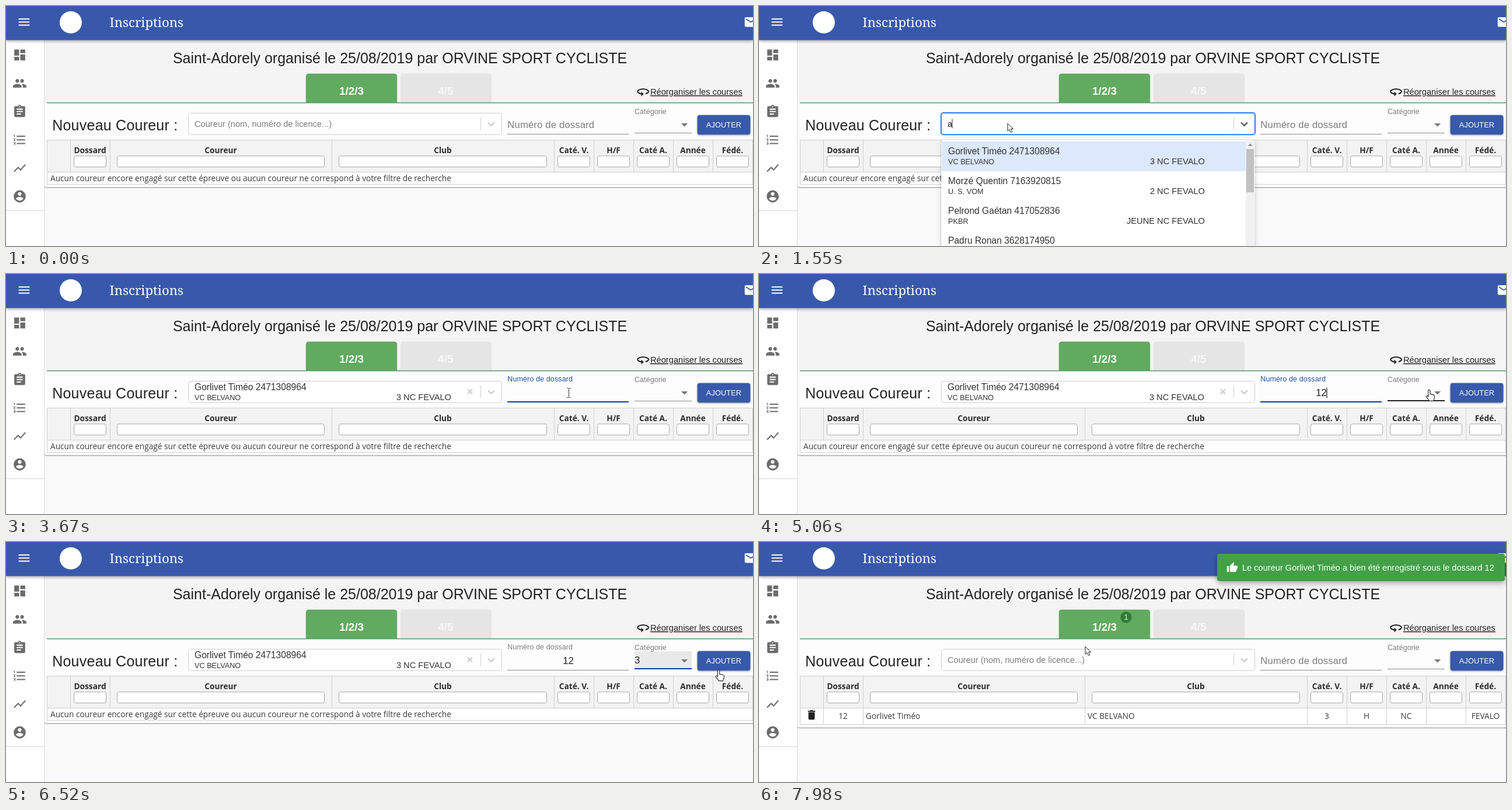
An HTML page for the animation above (8 s loop, 1280 by 411 pixels).

```html
<!DOCTYPE html>
<html lang="fr">
<head>
<meta charset="utf-8">
<title>Inscriptions</title>
<style>
html, body { margin: 0; width: 100%; height: 100%; overflow: hidden; background: #fafafa; }
svg { display: block; width: 100%; height: 100%; }
text { font-family: "Liberation Sans", Arial, sans-serif; fill: #222; }
.tab { font-weight: 700; font-size: 18.9px; text-anchor: middle; }
.os, .th { font-family: "Open Sans", sans-serif; font-size: 13.7px; fill: #3a3a3a; }
.th { font-weight: 700; fill: #2c2c2c; }
.mid { text-anchor: middle; }
.name { font-size: 15.6px; fill: #333; }
.club { font-size: 12.7px; fill: #333; }
.info { font-size: 14.65px; fill: #333; text-anchor: end; }
.mui { letter-spacing: .0094em; }
</style>
</head>
<body>
<svg id="stage" viewBox="0 0 1280 411" preserveAspectRatio="none"></svg>
<script>
const LOOP = 8000;
const RIDER = 'Gorlivet Timéo', CLUB = 'VC BELVANO', FED = 'FEVALO';

// ---- drawing helpers
const rect = (x, y, w, h, fill, more = '') =>
  `<rect x="${x}" y="${y}" width="${w}" height="${h}" fill="${fill}" ${more}/>`;
const text = (x, y, s, cls = '', more = '') => `<text x="${x}" y="${y}" class="${cls}" ${more}>${s}</text>`;
const icon = (x, y, k, fill, d) => `<path transform="translate(${x} ${y}) scale(${k})" fill="${fill}" d="${d}"/>`;
const group = (id, body, more = '') => `<g id="${id}" ${more}>${body}</g>`;
const line = (x1, y1, x2, y2, c, w = 1) =>
  `<path d="M${x1} ${y1}L${x2} ${y2}" stroke="${c}" stroke-width="${w}"/>`;
const shadow = (y, blur, a) => `style="filter:drop-shadow(0 ${y}px ${blur}px rgba(0,0,0,${a}))"`;

const sideIcons = [
  'M3 13h8V3H3v10zm0 8h8v-6H3v6zm10 0h8V11h-8v10zm0-18v6h8V3h-8z',
  'M16 11c1.66 0 3-1.34 3-3s-1.34-3-3-3-3 1.34-3 3 1.34 3 3 3zm-8 0c1.66 0 3-1.34 3-3S9.66 5 8 5 5 6.34 5 8s1.34 3 3 3zm0 2c-2.33 0-7 1.17-7 3.5V19h14v-2.5c0-2.33-4.67-3.5-7-3.5zm8 0c-.3 0-.62 0-.97.05 1.16.84 1.97 1.97 1.97 3.45V19h6v-2.5c0-2.33-4.67-3.5-7-3.5z',
  'M19 3h-4.18a3 3 0 0 0-5.64 0H5a2 2 0 0 0-2 2v14a2 2 0 0 0 2 2h14a2 2 0 0 0 2-2V5a2 2 0 0 0-2-2zm-7 0a1 1 0 0 1 0 2 1 1 0 0 1 0-2zm2 14H7v-2h7v2zm3-4H7v-2h10v2zm0-4H7V7h10v2z',
  'M2 17h2v.5H3v1h1v.5H2v1h3v-4H2v1zm1-9h1V4H2v1h1v3zm-1 3h1.8L2 13.1v.9h3v-1H3.2L5 10.9V10H2v1zm5-6v2h14V5H7zm0 14h14v-2H7v2zm0-6h14v-2H7v2z',
  'M3.5 18.5l6-6 4 4L22 6.9l-1.4-1.4-7.1 8-4-4L2 17z',
  'M12 2a10 10 0 0 0 0 20 10 10 0 0 0 0-20zm0 3a3 3 0 0 1 0 6 3 3 0 0 1 0-6zm0 14.2c-2.5 0-4.7-1.28-6-3.22.03-2 4-3.08 6-3.08s5.97 1.09 6 3.08c-1.3 1.94-3.5 3.22-6 3.22z'
];
const menu = 'M3 18h18v-2H3v2zm0-5h18v-2H3v2zm0-7v2h18V6z';
const mail = 'M20 4H4a2 2 0 0 0-2 2v12a2 2 0 0 0 2 2h16a2 2 0 0 0 2-2V6a2 2 0 0 0-2-2zm0 4l-8 5-8-5V6l8 5 8-5v2z';
const turn = 'M12 7C6.48 7 2 9.24 2 12c0 2.24 2.94 4.13 7 4.77V20l4-4-4-4v2.73c-3.15-.56-5-1.9-5-2.73 0-1.06 3.04-3 8-3s8 1.94 8 3c0 .73-1.46 1.89-4 2.53v2.05c3.53-.77 6-2.53 6-4.58 0-2.76-4.48-5-10-5z';
const thumb = 'M1 21h4V9H1v12zm22-11a2 2 0 0 0-2-2h-6.3l1-4.9c0-.4-.2-.8-.5-1L14.2 1 7.6 7.6A2 2 0 0 0 7 9v10a2 2 0 0 0 2 2h9c.8 0 1.5-.5 1.8-1.2l3-7c.1-.3.2-.5.2-.8z';
const bin = 'M6 19a2 2 0 0 0 2 2h8a2 2 0 0 0 2-2V7H6v12zM19 4h-3.5l-1-1h-5l-1 1H5v2h14V4z';

// ---- page parts
const edges = [70, 110, 178, 558, 939, 1007, 1075, 1143, 1211, 1279];
const heads = ['', 'Dossard', 'Coureur', 'Club', 'Caté. V.', 'H/F', 'Caté A.', 'Année', 'Fédé.'];
const cells = ['', '12', RIDER, CLUB, '3', 'H', 'NC', '', FED];
const mid = i => (edges[i] + edges[i + 1]) / 2;
const grid = (y1, y2) => edges.map(x => line(x + .5, y1, x + .5, y2, '#cfcfcf')).join('');
const tab = (x, fill) => `<path d="M${x} 165V121q0-5.3 5-5.3h146.4q5 0 5 5.3v44z" fill="${fill}"/>`;

function tableHead() {
  let s = rect(70, 229, 1209, 56, '#f3f3f3') + line(70, 229.5, 1280, 229.5, '#cfcfcf') +
    line(70, 284.5, 1280, 284.5, '#cfcfcf') + grid(229, 285);
  heads.forEach((h, i) => {
    if (!h) return;
    const w = edges[i + 1] - edges[i], pad = w > 100 ? 12 : 6;
    s += text(mid(i), 251.5, h, 'th mid') +
      rect(edges[i] + pad + .5, 256.8, w - 2 * pad - 1, 19, '#fff', 'rx="3" stroke="#a9a9a9"');
  });
  return s;
}

function tableRow() {
  let s = rect(70, 285, 1209, 27, '#fff') + grid(285, 312) + line(70, 312.5, 1280, 312.5, '#cfcfcf');
  cells.forEach((c, i) => {
    const left = i === 2 || i === 3;
    s += text(left ? edges[i] + 5 : mid(i), 303, c, left ? 'os' : 'os mid');
  });
  return s + icon(79.3, 285.3, .9, '#222', bin);
}

function riderList() {
  const rows = [
    [RIDER + ' 2471308964', CLUB, '3 NC ' + FED],
    ['Morzé Quentin 7163920815', 'U. S. VOM', '2 NC ' + FED],
    ['Pelrond Gaétan 417052836', 'PKBR', 'JEUNE NC ' + FED],
    ['Padru Ronan 3628174950', '', '']
  ];
  return rect(312, 229, 538, 200, '#fff', 'rx="4" stroke="rgba(0,0,0,.12)" ' + shadow(3, 5, .14)) +
    rect(313, 232, 521, 51, '#dce8fb') +
    rows.map(([n, c, r], i) => text(324, 254 + 51 * i, n, 'name') +
      text(324, 271 + 51 * i, c, 'club') + text(764, 271 + 51 * i, r, 'info')).join('') +
    rect(834, 230, 15.5, 181, '#f1f1f1') + rect(835, 245, 13, 74, '#c1c1c1') +
    '<path d="M838 239.5l3.7-4 3.7 4z" fill="#8a8a8a"/>';
}

function categoryList() {
  const items = ['', '1', '2', '3', '4', '5', 'J', 'PC', 'NC'];
  return rect(1077, 90, 145, 355, '#fff', 'rx="4" ' + shadow(4, 6, .3)) +
    `<rect id="hover" x="1077" y="98" width="145" height="37.5" fill="#ebebeb"/>` +
    items.map((s, i) => text(1094, 122.5 + 37.5 * i, s, 'mui', 'font-size="16.67"')).join('');
}

stage.innerHTML =
  rect(0, 0, 1280, 411, '#fafafa') +
  `<rect id="paper" x="66" y="50" width="1230" height="260" rx="4" fill="#fdfdfd" ${shadow(1, 1, .45)}/>` +
  rect(66, 58, 1214, 107, '#f4f4f4') +
  rect(0, 58, 65, 353, '#fff') + line(65.5, 58, 65.5, 411, '#dcdcdc') + line(0, 350.5, 65, 350.5, '#d6d6d6') +
  sideIcons.map((d, i) => icon(11, 71.5 + 48.4 * i, 1.04, '#6c6c6c', d)).join('') +
  rect(0, -10, 1280, 68.3, '#3859aa', shadow(2, 2.5, .35)) +
  icon(18.5, 15, 1.04, '#fff', menu) +
  '<circle cx="111" cy="28" r="19" fill="#fff"/>' +
  text(177.5, 36, 'Inscriptions', '', 'style="font:22.2px \'Noto Serif\',serif;fill:#fff"') +
  icon(1263.7, 15, 1.04, '#fff', mail) +
  text(675, 98, 'Saint-Adorely organisé le 25/08/2019 par ORVINE SPORT CYCLISTE', 'mid', 'font-size="25"') +
  tab(513.8, '#60ab5f') + tab(675.8, '#e5e5e5') +
  text(592, 152, '1/2/3', 'tab', 'style="fill:#fff"') + text(753.5, 152, '4/5', 'tab', 'style="fill:#f7f7f7"') +
  group('badge', '<circle r="9.7" fill="#2f7d36"/>' + text(0, 4.3, '1', 'mid', 'font-size="12" style="fill:#fff"')) +
  line(70, 165.8, 1280, 165.8, '#57996a', 1.6) +
  icon(1079.2, 134, 1.04, '#222', turn) +
  text(1104, 152, 'Réorganiser les courses', '', 'font-size="14.65" text-decoration="underline"') +
  text(79.2, 212.5, 'Nouveau Coureur :', 'mui', 'font-size="25"') +

  // rider select
  '<rect id="box" rx="4" fill="#fff"/>' +
  text(323, 206.5, 'Coureur (nom, numéro de licence...)', '', 'id="hint" font-size="14.65" style="fill:#7d7d7d"') +
  text(323, 206.5, 'a', '', 'id="typed" font-size="14.65"') +
  '<rect id="caret" y="193.5" width="1" height="16" fill="#222"/>' +
  group('chosen', text(323, 198.5, RIDER + ' 2471308964', 'name') + text(323, 215.5, CLUB, 'club') +
    text(763, 215.5, '3 NC ' + FED, 'info') +
    '<path id="cross" d="M791 197.5l8 8m0-8l-8 8" stroke-width="2.2"/>') +
  line(813.5, 191, 813.5, 212, '#ccc') +
  '<path id="chevron" d="M826 199.5l5.5 5.3 5.5-5.3" fill="none" stroke-width="2.4"/>' +

  // number field
  line(859, 219.5, 1067, 219.5, '#8c8c8c') +
  '<rect id="numLine" y="218" height="2"/>' +
  text(0, 0, 'Numéro de dossard', 'mui', 'id="numLabel" font-size="16.67"') +
  group('num', text(963.5, 209, '12', 'mid', 'font-size="16.67"')) +
  '<rect id="numCaret" y="194.5" width="1.2" height="18" fill="#222"/>' +

  // category field
  '<rect id="catFill" x="1077" y="187" width="98" height="30" fill="#e9e9e9"/>' +
  line(1077, 217.5, 1175, 217.5, '#8c8c8c') +
  '<rect id="catLine" x="1077" y="216" width="98" height="2"/>' +
  text(1077, 185.3, 'Catégorie', 'mui', 'font-size="12.4" style="fill:#7a7a7a"') +
  text(1077, 207.5, '3', '', 'id="catValue" font-size="16.67"') +
  '<path d="M1157 201h11l-5.5 5.5z" fill="#757575"/>' +

  // button
  '<clipPath id="btnClip"><rect x="1184.6" y="186.7" width="90.8" height="33.6" rx="4"/></clipPath>' +
  rect(1184.6, 186.7, 90.8, 33.6, '#3859aa', 'rx="4" ' + shadow(1.5, 1.5, .4)) +
  '<rect id="dark" x="1184.6" y="186.7" width="90.8" height="33.6" rx="4" fill="#183f88"/>' +
  '<circle id="ripple" cx="1230" cy="205" fill="#fff" clip-path="url(#btnClip)"/>' +
  text(1230, 208, 'AJOUTER', 'mid', 'font-size="12.7" letter-spacing=".15" style="fill:#fff"') +

  tableHead() +
  group('empty', rect(70, 285, 1209, 20, '#fff') + line(70.5, 285, 70.5, 305, '#cfcfcf') +
    line(1279.5, 285, 1279.5, 305, '#cfcfcf') + line(70, 305.5, 1280, 305.5, '#cfcfcf') +
    text(76, 300, 'Aucun coureur encore engagé sur cette épreuve ou aucun coureur ne correspond à votre filtre de recherche', 'os')) +
  group('row', tableRow()) +
  group('riders', riderList()) +
  group('cats', categoryList()) +
  group('toast', rect(785, 20, 493, 47, '#43a047', 'rx="4" ' + shadow(3, 5, .35)) +
    icon(801, 33.9, .83, '#fff', thumb) +
    text(828, 48.5, `Le coureur ${RIDER} a bien été enregistré sous le dossard 12`, '', 'font-size="14.6" style="fill:#fff"')) +
  group('pointer',
    '<path id="arrow" d="M0 0v13.2l3-2.9 2.4 5.2 2.4-1.1-2.3-5h4.2z" fill="#fff" stroke="#222"/>' +
    '<path id="hand" d="M-1.6 1.2q1.6-2.2 3.2 0v6l5.8 1.5q2 .6 2 2.8l-1 5-1 2.5h-7.2q-2-3.4-5.2-6.7 0-2.4 2-2l1.4 1.4z" fill="#fff" stroke="#222" stroke-width="1.1"/>' +
    '<path id="beam" d="M-3-8h2l1 1 1-1h2M0-7v14m-3 1h2l1-1 1 1h2" fill="none" stroke="#333"/>');

// ---- timing
// runs of picture changes: first, last, count
const runs = [[0, 0, 1], [70, 860, 11], [920, 920, 1], [1170, 1240, 2], [1550, 2010, 7], [2180, 2880, 10],
  [3120, 3370, 4], [3670, 3670, 1], [3970, 3970, 1], [4530, 5280, 10], [5360, 5830, 7],
  [5990, 6750, 11], [6830, 7610, 11], [7690, 7980, 5]];

// pointer tip: time, x, y
const path = [[70, 976, 400], [320, 800, 325], [600, 530, 238], [860, 426, 201], [1550, 426, 201],
  [2010, 480, 260], [2180, 480, 260], [2570, 885, 183], [2880, 963, 204], [4530, 966, 203],
  [4740, 1060, 150], [4900, 1180, 186], [5060, 1141, 201], [5360, 1147, 204], [5830, 1150, 224],
  [6150, 1150, 224], [6520, 1221, 219], [6750, 1230, 204], [7610, 1231, 203], [7980, 559, 179]];

const at = id => document.getElementById(id);
const clamp = p => Math.min(1, Math.max(0, p));
const ramp = (t, from, dur) => clamp((t - from) / dur);
const smooth = p => p * p * (3 - 2 * p);
const out = p => 1 - (1 - p) ** 4;
const within = (t, a, b) => t >= a && t < b;
const show = (id, on) => at(id).setAttribute('display', on ? 'inline' : 'none');
const set = (id, attrs) => { for (const k in attrs) at(id).setAttribute(k, attrs[k]); };
const grow = (x, y, sx, sy) => `translate(${x} ${y}) scale(${sx} ${sy}) translate(${-x} ${-y})`;

function hold(t) {
  const [a, b, n] = runs.filter(r => r[0] <= t).pop();
  if (n < 2 || t >= b) return b;
  const step = (b - a) / (n - 1);
  return a + Math.floor((t - a) / step + .05) * step;
}

function tip(t) {
  let i = 0;
  while (i < path.length - 2 && path[i + 1][0] <= t) i++;
  const [a, b] = [path[i], path[i + 1]], p = ramp(t, a[0], b[0] - a[0]);
  return [a[1] + (b[1] - a[1]) * p, a[2] + (b[2] - a[2]) * p];
}

function draw(now) {
  const t = hold(now % LOOP);
  const done = t >= 7290;

  // rider select
  const focus = within(t, 920, 3120);
  set('box', focus
    ? { x: 312, y: 183, width: 538, height: 37.2, stroke: '#2380f5', 'stroke-width': 2 }
    : { x: 312.5, y: 183.5, width: 537, height: 36.7, stroke: within(t, 780, 920) ? '#b3b3b3' : '#ccc', 'stroke-width': 1 });
  set('chevron', { stroke: focus ? '#555' : '#ccc' });
  set('cross', { stroke: focus ? '#555' : '#ccc' });
  show('hint', t < 1170 || done);
  show('typed', within(t, 1170, 2180));
  show('caret', within(t, 920, 2180));
  set('caret', { x: t < 1170 ? 322.5 : 330.5 });
  show('riders', within(t, 1240, 2180));
  show('chosen', t >= 2180 && !done);

  // number field
  const active = within(t, 3120, 5360);
  const up = done ? 1 - out(ramp(t, 7300, 200)) : out(ramp(t, 3060, 220));
  const k = 1 - .25 * up;
  set('numLabel', {
    transform: `translate(859.3 ${208.8 - 24.8 * up}) scale(${k})`,
    style: `fill:${active ? '#1f4f9f' : '#7d7d7d'}`
  });
  const w = active ? 208 * out(ramp(t, 3060, 220)) : 208;
  set('numLine', { x: 963 - w / 2, width: w, fill: active ? '#0c3d94' : '#333' });
  show('numLine', active || within(t, 2800, 3120));
  show('num', t >= 3970 && !done);
  show('numCaret', within(t, 3200, 3670) || within(t, 3970, 5360));
  set('numCaret', { x: t < 3970 ? 963.2 : 972.4 });

  // category field
  const picked = t >= 5990 && !done;
  show('catFill', within(t, 5360, 6830));
  show('catValue', picked);
  show('catLine', within(t, 5000, 6830));
  set('catLine', { fill: t < 5360 ? '#222' : '#0c3d94' });
  const open = smooth(ramp(t, 5300, 260)), shut = smooth(ramp(t, 6030, 200));
  show('cats', within(t, 5360, 6230));
  set('cats', { opacity: open * (1 - shut), transform: grow(1149, 205, .75 + .25 * open, .56 + .44 * open) });
  set('hover', { y: t < 5600 ? 98 + 37.5 * 2 : 98 + 37.5 * 3 });

  // button
  set('dark', { opacity: smooth(ramp(t, 6530, 220)) * (1 - smooth(ramp(t, 7630, 250))) });
  const wave = ramp(t, 6780, 480);
  show('ripple', wave > 0 && wave < 1);
  set('ripple', { r: 8 + 55 * out(wave), opacity: .3 * (1 - wave) });

  // result
  show('empty', !done);
  show('row', done);
  set('paper', { height: done ? 267.5 : 260 });
  show('badge', done);
  const b = smooth(ramp(t, 7260, 220));
  set('badge', { transform: `translate(629 129) scale(${b})` });
  const fade = smooth(ramp(t, 7205, 225)), size = .75 + .25 * smooth(ramp(t, 7205, 195));
  show('toast', fade > 0);
  set('toast', { opacity: fade, transform: grow(1031.5, 43.5, size, size) });

  // pointer
  const [x, y] = tip(t);
  const beam = within(t, 2700, 3970) || within(t, 4530, 4600);
  const hand = within(t, 5000, 7690);
  set('pointer', { transform: `translate(${x} ${y})` });
  show('pointer', t >= 70 && !within(t, 3970, 4530));
  show('beam', beam);
  show('hand', hand);
  show('arrow', !beam && !hand);
}

const start = performance.now();
(function frame() {
  draw(performance.now() - start);
  requestAnimationFrame(frame);
})();
</script>
</body>
</html>
```
